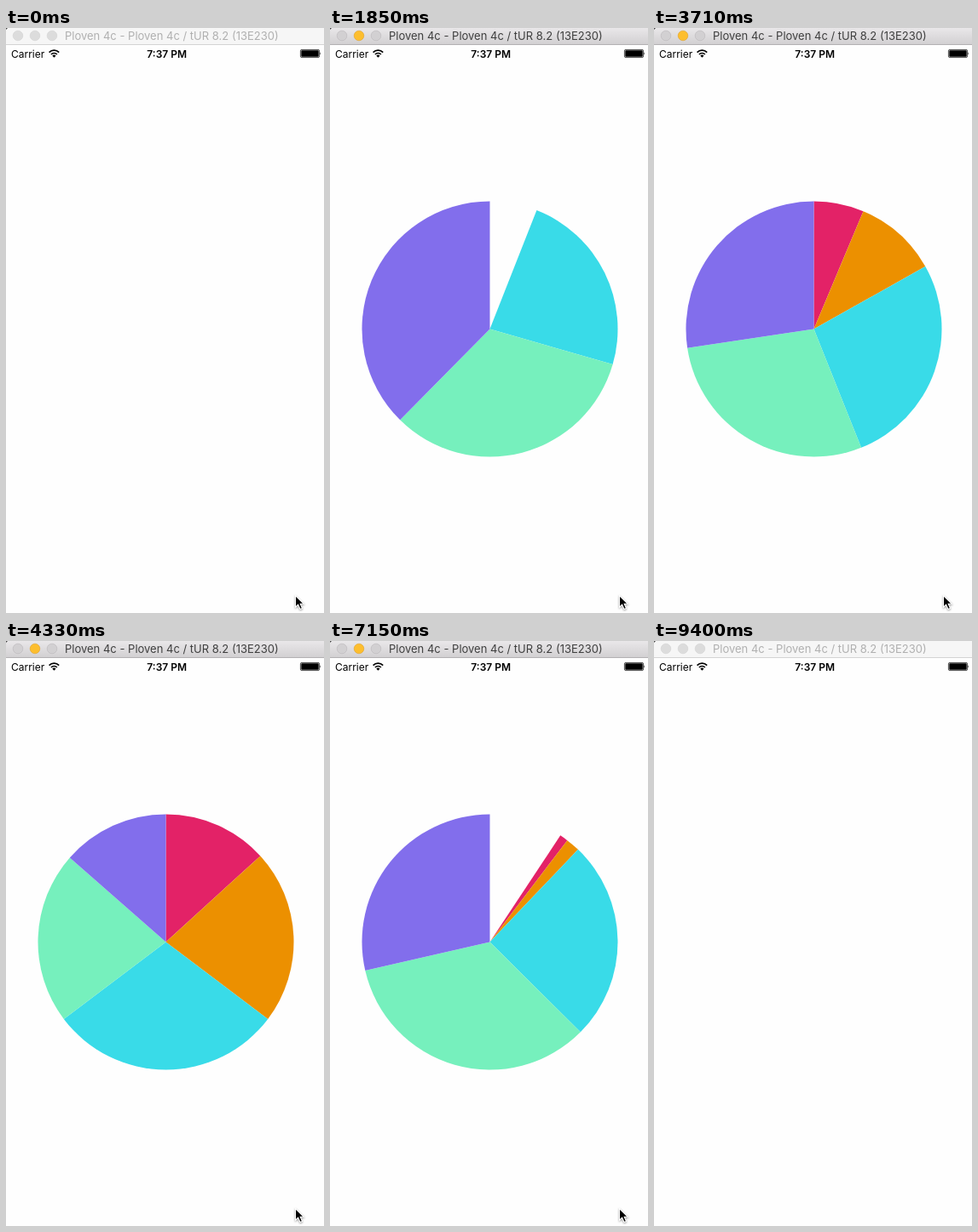
These frames come from a looping animation (373x687 px, 9480 ms). An HTML page:

```html
<!DOCTYPE html>
<html lang="en">
<head>
<meta charset="utf-8">
<title>Pie chart</title>
<style>
  html, body { margin: 0; width: 100%; height: 100%; overflow: hidden; background: #fefefe; }
  svg { display: block; width: 373px; height: 687px; }
  text { font-family: Inter, Roboto, sans-serif; font-size: 12px; fill: #000; }
  #bar text { font-size: 13px; fill: #b0b0b0; }
  #bar .bg { fill: #f6f6f6; }
  #bar .edge { fill: #d3d3d3; }
  #bar circle { fill: #dcdcdc; stroke: #d2d2d2; stroke-width: .6; }
  #bar.active text { fill: #3f3f3f; }
  #bar.active .bg { fill: url(#metal); }
  #bar.active .edge { fill: #b3b1b3; }
  #bar.active circle { fill: #d2d0d2; stroke: #bab8ba; }
  #bar.active .min { fill: #fdbe2e; stroke: #e0a12a; }
</style>
</head>
<body>
<svg viewBox="0 0 373 687">
  <defs>
    <linearGradient id="metal" x1="0" y1="0" x2="0" y2="1">
      <stop offset="0" stop-color="#e9e7e9"/>
      <stop offset="1" stop-color="#d1cfd1"/>
    </linearGradient>
  </defs>
  <rect width="373" height="687" fill="#fefefe"/>

  <g id="bar">
    <rect class="bg" width="373" height="20"/>
    <rect class="edge" y="19" width="373" height="1"/>
    <path d="M0 0H2L0 2Z" fill="#444"/>
    <circle cx="14" cy="9" r="5.8"/>
    <circle class="min" cx="34" cy="9" r="5.8"/>
    <circle cx="54" cy="9" r="5.8"/>
    <text x="69" y="14">Ploven 4c - Ploven 4c / tUR 8.2 (13E230)</text>
  </g>

  <g id="status">
    <text x="6" y="34.5">Carrier</text>
    <g fill="none" stroke="#000" stroke-width="1.7">
      <path d="M50.6 28.6A8.2 8.2 0 0 1 62.2 28.6"/>
      <path d="M52.9 31A5 5 0 0 1 59.9 31"/>
    </g>
    <path d="M56.4 34.8L54.3 32.6A3 3 0 0 1 58.5 32.6Z"/>
    <text x="188.7" y="34.5" text-anchor="middle" font-weight="600">7:37 PM</text>
    <rect x="345.4" y="25.4" width="22.2" height="9.2" rx="1.5" fill="#fefefe" stroke="#000" stroke-width=".7"/>
    <rect x="346.3" y="26.3" width="20.4" height="7.4" rx=".6"/>
    <path d="M368.5 28.3Q370 30 368.5 31.7Z"/>
  </g>

  <g id="pie"></g>

  <g id="cursor">
    <path d="M339.5 666.5V680.2L342.6 677.3L345 682.6L347.5 681.5L345.2 676.3H349.4Z"
          fill="#000" stroke="#fff" stroke-width="1.1" style="filter:drop-shadow(0 1px 1px rgba(0,0,0,.4))"/>
  </g>
</svg>
<script>
const LOOP = 9480, CX = 187.5, CY = 353.5, R = 150;
const COLORS = ['#e32267', '#ec9000', '#39dbe8', '#76f0bd', '#826eec'];

// Start angle of each slice in degrees; the last slice always ends at 360.
const EMPTY = [360, 360, 360, 360, 360];
const THREE = [0, 0, 0, 90, 216];
const FIVE = [0, 54, 144, 252, 324];
const PARTIAL = [36, 36, 36, 126, 252];

// Each phase redraws every `step` ms after `first`.
const PHASES = [
  { first: 270, step: 87.7, begin: 192, dur: 2000, from: EMPTY, to: THREE },
  { first: 2920, step: 87.7, begin: 2801, dur: 2000, from: THREE, to: FIVE },
  { first: 5650, step: 88, begin: 5518, dur: 2000, from: FIVE, to: PARTIAL },
  { first: 8230, step: 85, begin: 8170, dur: 300, from: PARTIAL, to: EMPTY }
];

const $ = id => document.getElementById(id);
const slices = COLORS.map(color => {
  const path = document.createElementNS('http://www.w3.org/2000/svg', 'path');
  path.setAttribute('fill', color);
  return $('pie').appendChild(path);
});

// cubic-bezier(.42, 0, .58, 1)
function easeInOut(x) {
  if (x <= 0) return 0;
  if (x >= 1) return 1;
  let lo = 0, hi = 1;
  for (let i = 0; i < 24; i++) {
    const s = (lo + hi) / 2;
    if (s * (1.26 + s * (-.78 + s * .52)) < x) lo = s; else hi = s;
  }
  return lo * lo * (3 - 2 * lo);
}

function anglesAt(t) {
  const p = PHASES.filter(p => t >= p.first).pop();
  if (!p) return EMPTY;
  const shown = p.first + Math.floor((t - p.first) / p.step) * p.step;
  const e = easeInOut((shown - p.begin) / p.dur);
  return p.from.map((a, i) => a + (p.to[i] - a) * e);
}

function rim(deg) {
  const a = deg * Math.PI / 180;
  return (CX + R * Math.sin(a)).toFixed(2) + ' ' + (CY - R * Math.cos(a)).toFixed(2);
}

function wedge(a, b) {
  if (b - a < .05) return '';
  return `M${CX} ${CY}L${rim(a)}A${R} ${R} 0 ${b - a > 180 ? 1 : 0} 1 ${rim(b)}Z`;
}

function draw(t) {
  const angles = anglesAt(t);
  slices.forEach((path, i) => path.setAttribute('d', wedge(angles[i], angles[i + 1] ?? 360)));
  $('bar').classList.toggle('active', t >= 270 && t < 9400);
  const shift = t < 8840 ? '0 0' : t < 8930 ? '1 4' : '3 12';
  $('cursor').setAttribute('transform', `translate(${shift})`);
  $('cursor').setAttribute('visibility', t < 9010 ? 'visible' : 'hidden');
}

const start = performance.now();
function tick() {
  draw((performance.now() - start) % LOOP);
  requestAnimationFrame(tick);
}
tick();
</script>
</body>
</html>
```
